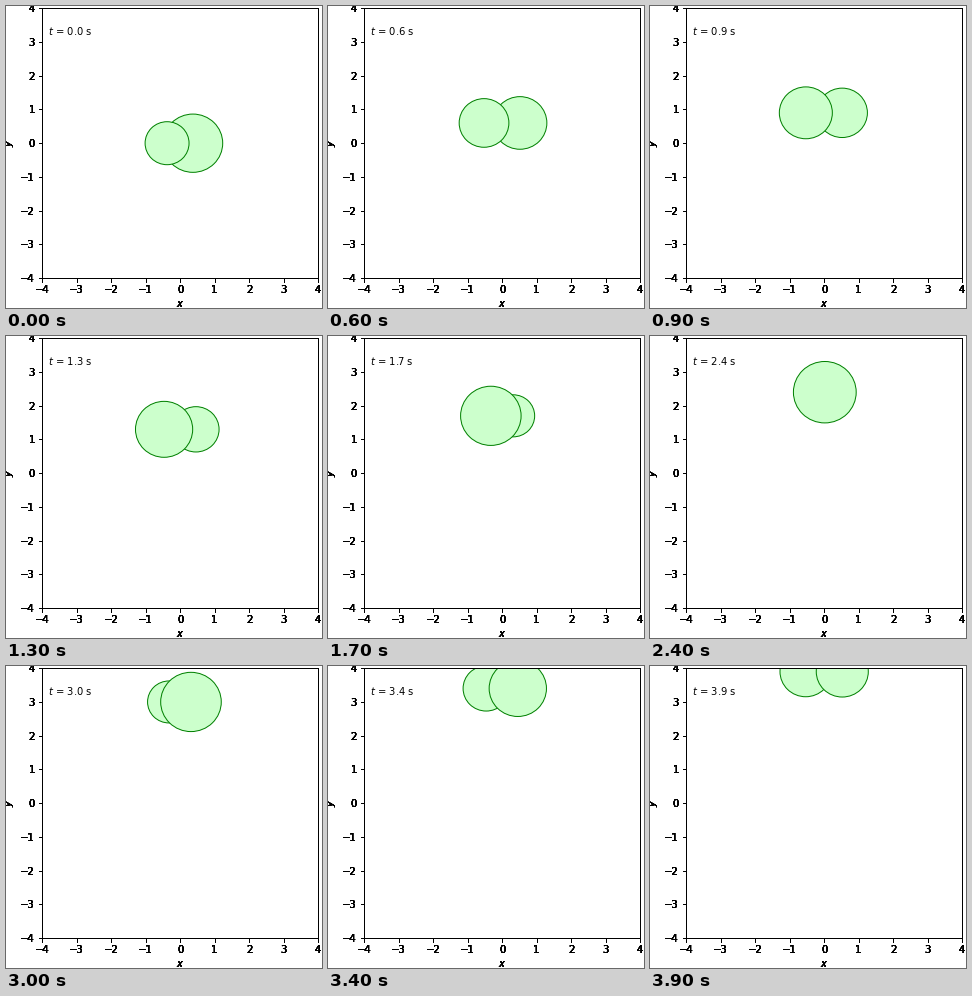
These frames come from a looping animation (316 px wide and 302 px high, 4 s). A matplotlib script:

```python
import numpy as np
import matplotlib.pyplot as plt
from matplotlib.animation import FuncAnimation
from matplotlib.patches import Circle

W, H, DPI = 316, 302, 72
LEFT, RIGHT, TOP, BOTTOM = 36.0, 312.0, 2.2, 272.2
FRAMES, INTERVAL = 40, 100
LAYERS = 8                      # stacked axes give the heavy labels
SWING, RADIUS, DEPTH = 0.53, 0.75, 0.16
PHASE = np.pi / 4

plt.rcParams.update({"font.family": "DejaVu Sans", "font.size": 10})
fig = plt.figure(figsize=(W / DPI, H / DPI), dpi=DPI, facecolor="white")


def add_layer(i):
    box = [LEFT / W, 1 - BOTTOM / H, (RIGHT - LEFT) / W, (BOTTOM - TOP) / H]
    ax = fig.add_axes(box, label=f"layer{i}", facecolor="none")
    ax.set(xlim=(-4, 4), ylim=(-4, 4),
           xticks=range(-4, 5), yticks=range(-4, 5))
    ax.set_xlabel("$x$", labelpad=4)
    ax.set_ylabel("$y$", labelpad=4)
    return ax


ax = [add_layer(i) for i in range(LAYERS)][0]


def add_ball():
    ball = Circle((0, 0), RADIUS, facecolor="#ccffcc", edgecolor="green",
                  linewidth=1)
    return ax.add_patch(ball)


back, front = add_ball(), add_ball()
clock = ax.text(0.02, 0.9, "", transform=ax.transAxes)


def update(frame):
    t = frame * INTERVAL / 1000
    angle = t + PHASE
    for ball, side in ((back, 1), (front, -1)):
        ball.center = (side * SWING * np.sin(angle), t)
        ball.set_radius(RADIUS + side * DEPTH * np.cos(angle))
    clock.set_text(f"$t$ = {t:.1f} s")
    return back, front, clock


anim = FuncAnimation(fig, update, frames=FRAMES, interval=INTERVAL,
                     init_func=lambda: update(0), repeat=True)
plt.show()
```
